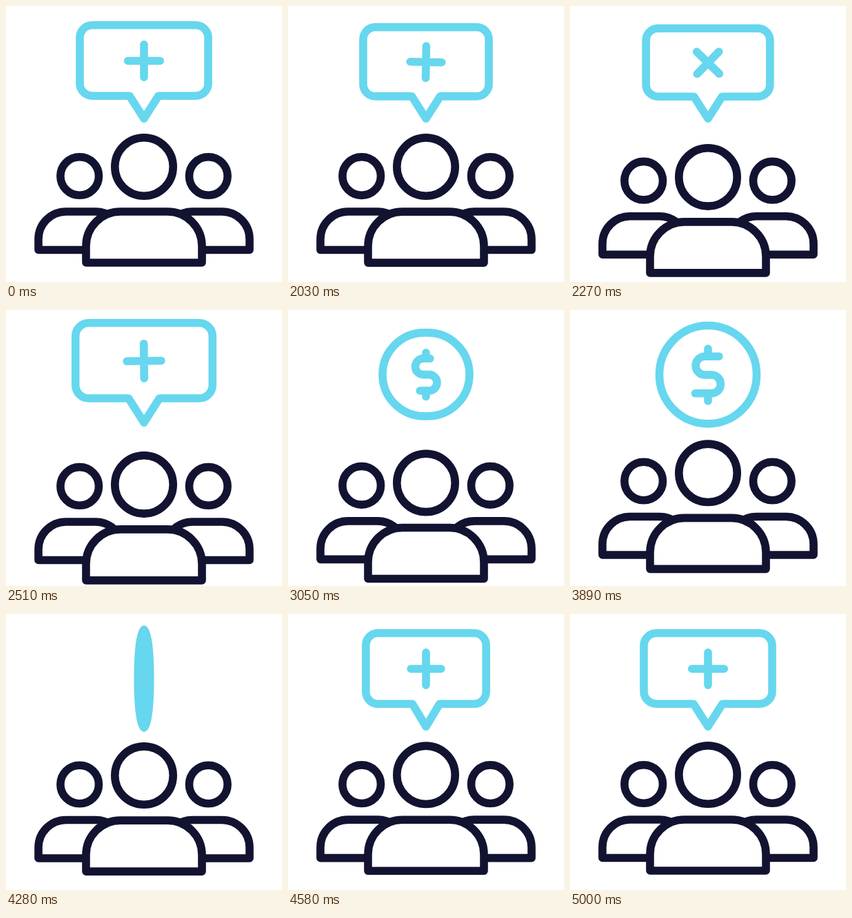
Animation, 400 px wide and 400 px high, one loop 5.03 s. Source, as an HTML page with a canvas:

```html
<!DOCTYPE html>
<html lang="en">
<head>
<meta charset="utf-8">
<title>Group consultation</title>
<style>
  html, body { margin: 0; width: 100%; height: 100%; overflow: hidden; background: #fff; }
  canvas { display: block; width: 100vw; height: 100vh; }
</style>
</head>
<body>
<canvas id="stage" width="400" height="400"></canvas>
<script>
const ctx = document.getElementById('stage').getContext('2d');
const LOOP = 5030, HOLD = 2030, STEP = 30;
const NAVY = '#121331', CYAN = '#66d7ee';
const DOLLAR_LENGTH = 138;

const lerp = (a, b, p) => a + (b - a) * p;

// cubic-bezier(.42, 0, .2, 1), solved by bisection
function ease(x) {
  if (x <= 0) return 0;
  if (x >= 1) return 1;
  let lo = 0, hi = 1, u = 0.5;
  for (let i = 0; i < 24; i++) {
    u = (lo + hi) / 2;
    const v = 1 - u;
    if (3 * u * v * v * 0.42 + 3 * u * u * v * 0.2 + u * u * u < x) lo = u;
    else hi = u;
  }
  return u * u * (3 - 2 * u);
}

const span = (t, from, to) => ease((t - from) / (to - from));

function track(keys, t) {
  for (let i = 1; i < keys.length; i++) {
    const [t0, a] = keys[i - 1], [t1, b] = keys[i];
    if (t < t1) return lerp(a, b, span(t, t0, t1));
  }
  return keys[keys.length - 1][1];
}

const SCALE = [[0, 1], [130, 0.88], [540, 1.068], [580, 1.068], [880, 0.77], [1400, 1.01], [1850, 1]];

// Builds a path under a transform but strokes it with an even line.
function shape(color, x, y, sx, sy, angle, build, fill) {
  ctx.save();
  ctx.translate(x, y);
  ctx.scale(sx, sy);
  ctx.rotate(angle);
  ctx.beginPath();
  build();
  ctx.restore();
  if (fill) {
    ctx.fillStyle = fill;
    ctx.fill();
  }
  ctx.strokeStyle = color;
  ctx.stroke();
}

function head(x, y, r) {
  shape(NAVY, x, y, 1, 1, 0, () => ctx.arc(0, 0, r, 0, Math.PI * 2));
}

function sidePerson(dir, dy) {
  shape(NAVY, 200, dy, dir, 1, 0, () => {
    ctx.moveTo(88, 353.5);
    ctx.lineTo(153, 353.5);
    ctx.lineTo(153, 338);
    ctx.arcTo(153, 298, 113, 298, 40);
    ctx.lineTo(70, 298);
    ctx.quadraticCurveTo(57, 298, 46, 306);
  });
  head(200 + dir * 93.3, 246.5 + dy, 27.8);
}

function people(t) {
  const down = t < 560 ? span(t, 0, 560) : 1 - span(t, 560, 2960);
  sidePerson(-1, 9 * down);
  sidePerson(1, 9 * down);
  const dy = 20 * down;
  shape(NAVY, 200, dy, 1, 1, 0, () => {
    ctx.moveTo(-84, 372);
    ctx.lineTo(-84, 348);
    ctx.arcTo(-84, 298, -34, 298, 50);
    ctx.lineTo(34, 298);
    ctx.arcTo(84, 298, 84, 348, 50);
    ctx.lineTo(84, 372);
    ctx.closePath();
  }, '#fff');
  head(200, 233 + dy, 42.2);
}

// m = 0 is the speech bubble, m = 1 is the coin.
function badge(m, s, cy, flip) {
  const w = lerp(93, 70.5, m), h = lerp(51.2, 71.2, m);
  const r = Math.min(w, h, lerp(18, 78, m));
  const base = 21 * (1 - m), tail = 33 * (1 - m) ** 2;
  shape(CYAN, 200, cy, s * flip, s, 0, () => {
    if (m >= 1) {
      ctx.ellipse(0, 0, w, h, 0, 0, Math.PI * 2);
      return;
    }
    ctx.moveTo(0, h + tail);
    ctx.lineTo(-base, h);
    ctx.arcTo(-w, h, -w, -h, r);
    ctx.arcTo(-w, -h, w, -h, r);
    ctx.arcTo(w, -h, w, h, r);
    ctx.arcTo(w, h, -w, h, r);
    ctx.lineTo(base, h);
    ctx.closePath();
  }, flip < 0.13 ? CYAN : null);
}

function plus(cy, s, flip, angle) {
  shape(CYAN, 200, cy, s * flip, s, angle, () => {
    ctx.moveTo(-23.3, 0);
    ctx.lineTo(23.3, 0);
    ctx.moveTo(0, -23.6);
    ctx.lineTo(0, 23.6);
  });
}

function dollar(cy, s, flip, k) {
  if (k < 1) {
    const full = DOLLAR_LENGTH * s;
    ctx.setLineDash([full * k, 1000]);
    ctx.lineDashOffset = -full * (1 - k) / 2;
  }
  shape(CYAN, 200, cy, s * flip, s, 0, () => {
    ctx.moveTo(16, -26.8);
    ctx.lineTo(-4.5, -26.8);
    ctx.arc(-4.5, -13.4, 13.4, -Math.PI / 2, Math.PI / 2, true);
    ctx.lineTo(5, 0);
    ctx.arc(5, 13.4, 13.4, -Math.PI / 2, Math.PI / 2);
    ctx.lineTo(-18.5, 26.8);
  });
  ctx.setLineDash([]);
  const tip = lerp(27, 38, k);
  shape(CYAN, 200, cy, s * flip, s, 0, () => {
    for (const d of [-1, 1]) {
      ctx.moveTo(0, d * 27);
      ctx.lineTo(0, d * tip);
    }
  });
}

function sign(t) {
  const turn = Math.cos(Math.PI * span(t, 1905, 3000));
  const flip = Math.max(0.01, Math.abs(turn));
  const back = turn < 0;
  const m = back ? 0 : span(t, 560, 1300);
  const s = back ? 1 : track(SCALE, t);
  const cy = lerp(163 - 84 * s, 93.7, m);
  badge(m, s, cy, flip);

  const shrink = back ? 1 : 1 - span(t, 560, 860);
  if (shrink > 0.01) {
    const angle = back ? 0 : Math.PI * span(t, 0, 560);
    plus(cy + 0.5 * s, s * shrink, flip, angle);
  }
  const k = back ? 0 : span(t, 720, 1280);
  if (k > 0.01) dollar(cy + 0.3 * s, s, flip, k);
}

function draw(now) {
  const at = now % LOOP;
  const t = at < HOLD ? 0 : (Math.floor((at - HOLD) / STEP) + 1) * STEP;
  ctx.fillStyle = '#fff';
  ctx.fillRect(0, 0, 400, 400);
  ctx.lineWidth = 11.6;
  ctx.lineCap = ctx.lineJoin = 'round';
  people(t);
  sign(t);
}

let start = null;
function tick(now) {
  if (start === null) start = now;
  draw(now - start);
  requestAnimationFrame(tick);
}
draw(0);
requestAnimationFrame(tick);
</script>
</body>
</html>
```
